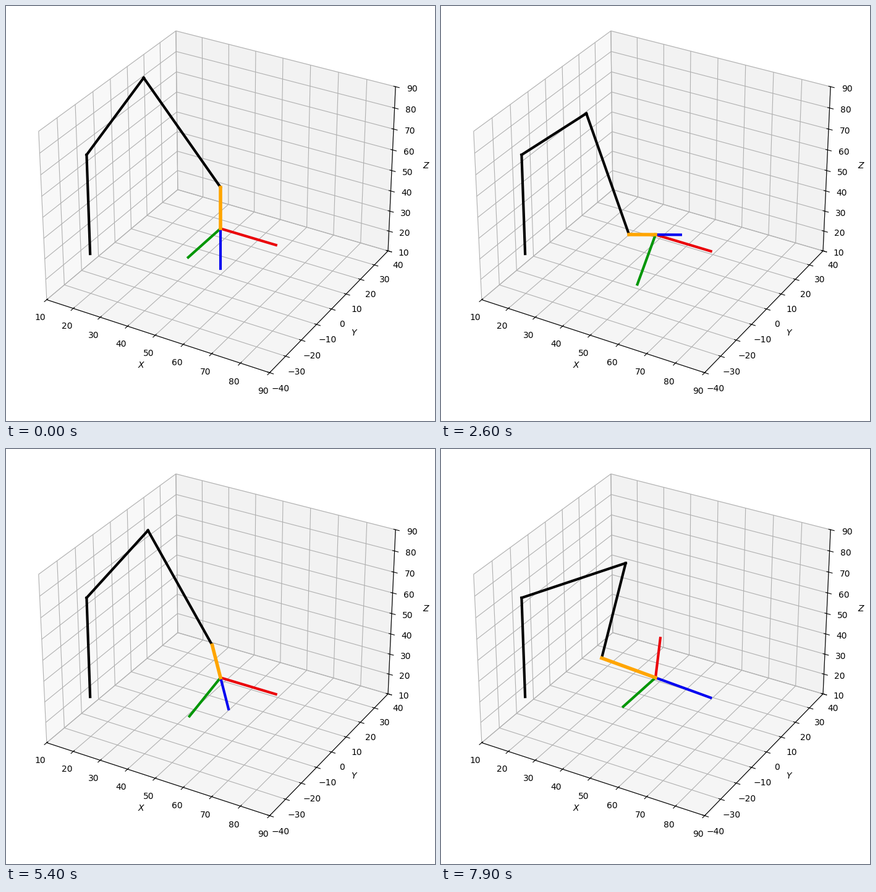
A matplotlib script for the animation above (8000 ms loop, 694 by 670 pixels).

```python
import numpy as np
import matplotlib.pyplot as plt
from matplotlib.animation import FuncAnimation

WIDTH, HEIGHT, DPI = 694, 670, 100
FRAMES, INTERVAL = 80, 100

LINK = 50.0          # base column, upper arm and forearm
TOOL = 20.0          # tool and tool-frame axes
STEPS_PER_FRAME = 0.8
DEG_PER_STEP = 5

plt.rcParams["font.family"] = "DejaVu Sans"
fig = plt.figure(figsize=(WIDTH / DPI, HEIGHT / DPI), dpi=DPI, facecolor="white")
side = 642
ax = fig.add_axes([17.35 / WIDTH, 37.5 / HEIGHT, side / WIDTH, side / HEIGHT],
                  projection="3d")
ax.view_init(elev=30, azim=-60)
ax.set(xlim=(10, 90), ylim=(-40, 40), zlim=(10, 90),
       xlabel="$X$", ylabel="$Y$", zlabel="$Z$")
for axis, start in ((ax.xaxis, 10), (ax.yaxis, -40), (ax.zaxis, 10)):
    axis.set_ticks(range(start, start + 81, 10))


def segment(color, width=3):
    return ax.plot([], [], [], color=color, lw=width)[0]


links = [segment("black") for _ in range(3)]
tool_axes = [segment(c) for c in ("#ea0008", "#009606", "#0000f0")]
tool = segment("orange", 4)


def pose(frame):
    """Tip height, roll about X and pitch about Y (degrees)."""
    step = int(np.floor(STEPS_PER_FRAME * (frame - 14) + 1e-6)) + 2
    if step < 0:
        return 30 + 0.375 * min(-step, 8), 0, 0
    if step <= 18:
        return 30, DEG_PER_STEP * step, 0
    if step <= 37:
        return 30, DEG_PER_STEP * (37 - step), 0
    return 30, 0, DEG_PER_STEP * (step - 37)


def tool_frame(roll, pitch):
    r, p = np.radians([roll, pitch])
    rot_x = np.array([[1, 0, 0],
                      [0, np.cos(r), -np.sin(r)],
                      [0, np.sin(r), np.cos(r)]])
    rot_y = np.array([[np.cos(p), 0, -np.sin(p)],
                      [0, 1, 0],
                      [np.sin(p), 0, np.cos(p)]])
    return rot_x @ rot_y @ np.diag([1, -1, -1])


def elbow_position(wrist):
    """Elbow-up solution for two equal links from the shoulder."""
    reach, rise = np.hypot(wrist[0], wrist[1]), wrist[2] - LINK
    half = np.arccos(np.hypot(reach, rise) / (2 * LINK))
    lift = np.arctan2(rise, reach) + half
    heading = np.arctan2(wrist[1], wrist[0])
    radius = LINK * np.cos(lift)
    return np.array([radius * np.cos(heading), radius * np.sin(heading),
                     LINK + LINK * np.sin(lift)])


def place(line, a, b):
    line.set_data_3d(*zip(a, b))


def update(frame):
    height, roll, pitch = pose(frame)
    tip = np.array([50.0, 0.0, height])
    frame_axes = tool_frame(roll, pitch).T
    wrist = tip - TOOL * frame_axes[2]
    joints = [np.zeros(3), np.array([0, 0, LINK]), elbow_position(wrist), wrist]
    for line, a, b in zip(links, joints, joints[1:]):
        place(line, a, b)
    for line, direction in zip(tool_axes, frame_axes):
        place(line, tip, tip + TOOL * direction)
    place(tool, wrist, tip)
    return [*links, *tool_axes, tool]


anim = FuncAnimation(fig, update, frames=FRAMES, interval=INTERVAL,
                     repeat=True, repeat_delay=0, blit=False)
plt.show()
```
